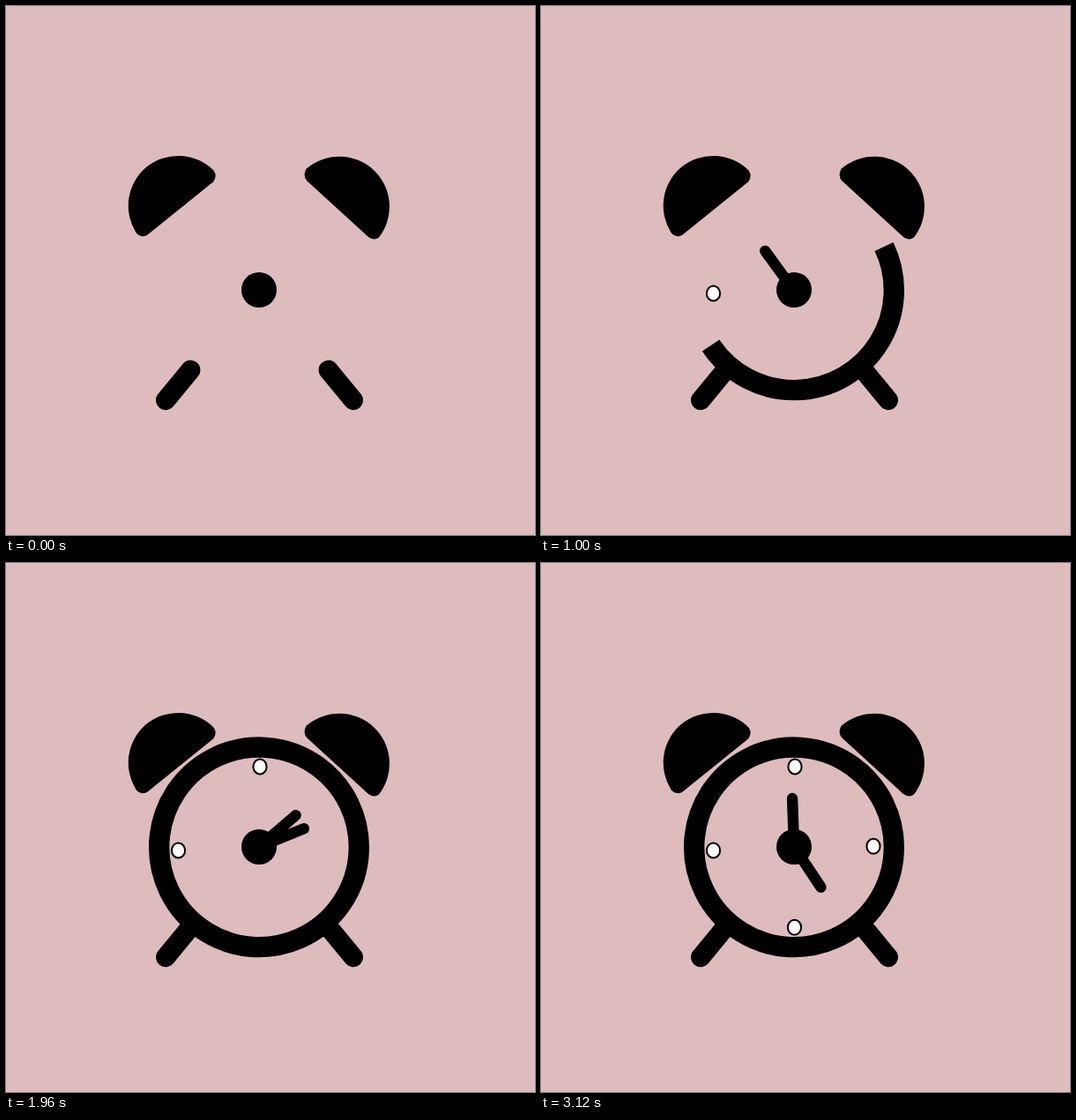
Write an HTML page that moves like this. It is 600 px wide and 600 px high and loops after 3.28 s.

```html
<!DOCTYPE html>
<html lang="en">
<head>
<meta charset="utf-8">
<title>Alarm clock</title>
<style>
  html, body { margin: 0; width: 100%; height: 100%; overflow: hidden; background: #debcbd; }
  svg { display: block; width: 100%; height: 100%; }
</style>
</head>
<body>
<svg viewBox="0 0 600 600">
  <path d="M148.200 258A57 57 0 0 1 159.500 182.500A57 57 0 0 1 235.500 186.500Q240 193 235 199.400L160.300 259.700Q153 263.500 148.200 258Z"/>
  <path d="M340.500 184.800A57 57 0 0 1 416.900 186A57 57 0 0 1 423 262.500Q417 266.500 411 262L341 198Q336.500 192 340.500 184.800Z"/>
  <g stroke="#000" stroke-width="22.400" stroke-linecap="round">
    <path d="M209.200 413L181.200 447"/>
    <path d="M365.800 413L393.800 447"/>
  </g>
  <path id="ring" fill="none" stroke="#000" stroke-width="23.400"/>
  <g id="dots" fill="#fff" stroke="#000"></g>
  <g stroke="#000" stroke-width="12.400" stroke-linecap="round">
    <line id="hour"/>
    <line id="minute"/>
  </g>
  <circle cx="287" cy="322" r="20"/>
</svg>
<script>
const LOOP = 3280, STEP = 40, LAST = 3120;
const CX = 287, CY = 322, HAND = 55, RING = 113.3;
const byId = id => document.getElementById(id);
const clamp = x => Math.max(0, Math.min(1, x));
const set = (el, attrs) => {
  for (const name in attrs) el.setAttribute(name, attrs[name]);
};

// [time, degrees clockwise from twelve]
const hourTurn = [[280, -92], [600, -68.3], [1000, -36.6], [1600, 11.5], [2320, 90], [2680, 133.5], [3120, 146.3]];
const minuteTurn = [[1700, 90], [2320, 38], [2680, 13.5], [3120, -2]];

const dots = [[195.5, 326, 360], [288, 231, 1320], [377, 321.3, 2280], [287.5, 413.3, 2280]]
  .map(([cx, cy, start]) => {
    const el = document.createElementNS("http://www.w3.org/2000/svg", "ellipse");
    set(el, { cx, cy, rx: 7.6, ry: 8.5 });
    byId("dots").append(el);
    return { el, start };
  });

// Smooth curve through the keys, at rest at the end.
function follow(keys, t) {
  const last = keys.length - 1;
  if (t >= keys[last][0]) return keys[last][1];
  const slope = i => {
    if (i === last) return 0;
    const a = keys[Math.max(0, i - 1)], b = keys[i + 1];
    return (b[1] - a[1]) / (b[0] - a[0]);
  };
  const i = Math.max(0, keys.findIndex(k => k[0] > t) - 1);
  const [t0, v0] = keys[i], [t1, v1] = keys[i + 1];
  const d = t1 - t0, u = clamp((t - t0) / d), w = 1 - u;
  return w * w * ((1 + 2 * u) * v0 + u * d * slope(i))
       + u * u * ((3 - 2 * u) * v1 - w * d * slope(i + 1));
}

function drawHand(el, keys, t, sag = 0) {
  const grown = clamp((t - keys[0][0]) / 160);
  const a = follow(keys, t) * Math.PI / 180;
  set(el, {
    visibility: grown > 0 ? "visible" : "hidden",
    x1: CX, y1: CY + sag * grown,
    x2: CX + HAND * grown * Math.sin(a),
    y2: CY - HAND * grown * Math.cos(a)
  });
}

function drawRing(t) {
  const sweep = Math.max(0, (t - 120) * 0.1957);
  const point = deg => {
    const a = deg * Math.PI / 180;
    return `${CX + RING * Math.cos(a)} ${CY + 0.3 + RING * Math.sin(a)}`;
  };
  const arc = deg => `A${RING} ${RING} 0 0 1 ${point(deg)}`;
  const from = -25.8, end = Math.min(sweep, 360);
  const path = `M${point(from)}${arc(from + end / 3)}${arc(from + end * 2 / 3)}${arc(from + end)}`;
  set(byId("ring"), { d: sweep > 0 ? path + (end === 360 ? "Z" : "") : "" });
}

function drawDot({ el, start }, t) {
  const age = t - start;
  const swell = 5 * clamp(age / 280), settle = 3 * clamp((age - 280) / 120);
  set(el, { visibility: age > 0 ? "visible" : "hidden", "stroke-width": swell - settle });
}

function draw(t) {
  drawRing(t);
  dots.forEach(dot => drawDot(dot, t));
  drawHand(byId("hour"), hourTurn, t, 9 * clamp((1040 - t) / 440));
  drawHand(byId("minute"), minuteTurn, t);
}

const begin = performance.now();
function tick() {
  const t = (performance.now() - begin) % LOOP;
  draw(Math.min(LAST, Math.floor(t / STEP) * STEP));
  requestAnimationFrame(tick);
}
tick();
</script>
</body>
</html>
```
